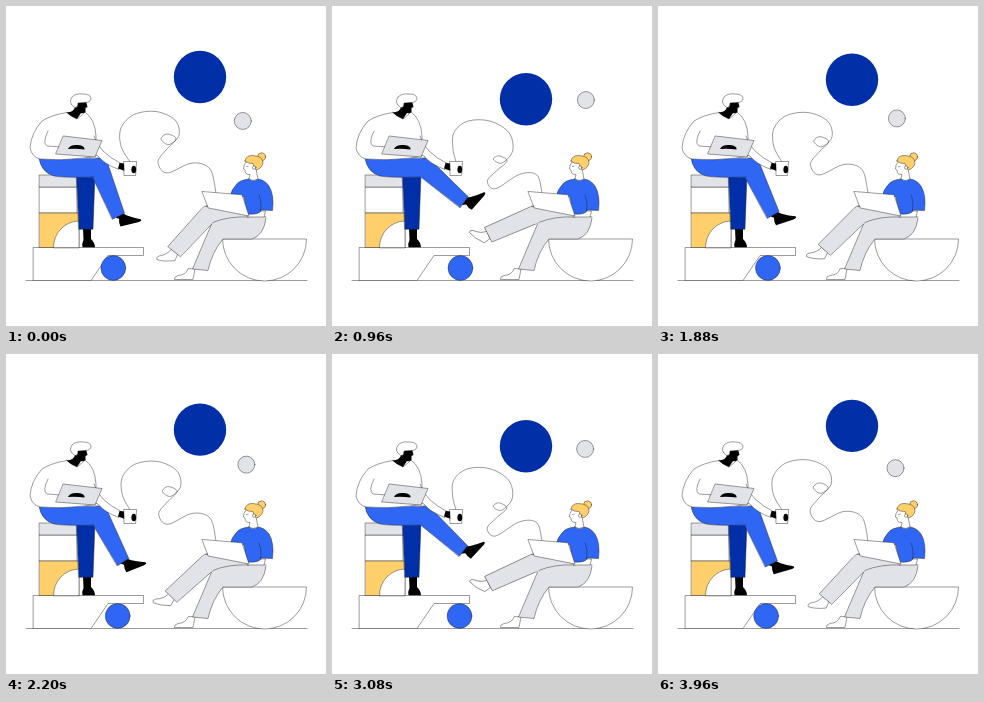
Animation of 320 by 320 pixels, one loop 4000 ms. Source, as an HTML page:

```html
<!DOCTYPE html>
<html lang="en">
<head>
<meta charset="utf-8">
<title>Coffee and laptops</title>
<style>
html, body { margin: 0; width: 100%; height: 100%; overflow: hidden; background: #fff; }
svg { display: block; width: 100vw; height: 100vh; }
.ln { fill: none; }
.flat { stroke: none; }
.w { fill: #fff; }
.k { fill: #000; stroke: none; }
.grey { fill: #e2e2e9; }
.blue { fill: #2f66f3; }
.navy { fill: #002fa7; }
.gold { fill: #ffcf6b; }
</style>
</head>
<body>
<svg viewBox="0 0 320 320" stroke="#222" stroke-width=".45" stroke-linejoin="round" stroke-linecap="round">
  <circle id="sun" class="navy flat" cx="194" r="26.2"/>
  <circle id="moon" class="grey" r="8.5"/>
  <path class="ln" d="M20 274.5H301"/>

  <!-- platform and stool -->
  <path class="w" d="M27.5 241.5H137.5V249.5H102L85 274.5H27.5Z"/>
  <circle id="ball" class="blue" cy="262" r="12.4"/>
  <path class="w" d="M33.5 181H71V207H33.5Z"/>
  <path class="grey" d="M33.5 169H71V181H33.5Z"/>
  <path class="gold" d="M33.5 207H73V241.5H33.5Z"/>
  <path class="w" d="M47.5 241.5A26 26 0 0 1 73 215V241.5Z"/>

  <path id="steam" class="ln"/>

  <!-- man -->
  <path class="k" d="M77 222H85V233Q89 237 89 241.2H76.5Q75.5 238 77.5 234Z"/>
  <path class="navy" d="M70.5 168H89L87 223.3H73Z"/>
  <g id="manShin">
    <path id="manFoot" class="k" d="M109 211L117 207.5L121 209.5Q128 212 134.5 213.2Q136.4 214.6 133 216L114.5 220.6Q112.6 217 113 213Z"/>
    <path class="blue" d="M84 165.7A9.7 9.7 0 1 1 102 158.3L118.5 207.3L106.5 213.2Z"/>
  </g>
  <path class="blue flat" d="M33 152L93 152.4A9.4 9.4 0 0 1 93 171.2Q60 172 48 170Q35 166 33 152Z"/>
  <path class="ln" d="M33 152Q35 166 48 170Q58 172 88 171M80 152H93"/>
  <path class="w" d="M61 106.5Q45 109 36 115Q25 127 24 142Q26 151 34 153Q55 155 78 152L90 150L90 130Q89 113 79 106Q75 110 71 113Q66 111 61 106.5Z"/>
  <path class="ln" d="M42 125Q36 137 41 140L55 141"/>
  <path class="w" d="M88 130Q92 146 116 158L113 163.5Q98 158 92 150L84 147"/>
  <path class="k" d="M69 97L80 95L81.5 101L79.5 102L79.5 106Q77 108 75 107L71 113Q65 111 60.5 106.5Q68 106 69 101Z"/>
  <path class="w" d="M68 101Q62 97 66 91Q70 87 77 88Q84 88 85 92Q85 96.5 79 96.5L72 97Q72 101 70 101.5Z"/>
  <path class="grey" d="M57.5 130L96 134.5L89 151L50 148Z"/>
  <path class="k" d="M62 143Q64 138.3 72 139Q79 139.7 78.5 143.5Q70 142.3 62 143Z"/>
  <path class="k" d="M113.5 157L119 157.5V165L112 162.5Z"/>
  <path class="w" d="M118 155.5H130.6L129.6 169.5H118.4Z"/>
  <ellipse class="k" cx="127.8" cy="163.5" rx="2.4" ry="3.8"/>

  <!-- woman -->
  <path class="w" d="M216.5 233H300.5A42 42 0 0 1 216.5 233Z"/>
  <path class="w" d="M189 263L187 273.5H168.5Q167.5 271 172 269.5Q180 269 182 263Z"/>
  <path class="grey" d="M206 217L186.5 263L202 264.5Q206 246 217 233H246Q258 229 260 212L225 206Z"/>
  <g id="womanShin">
    <path id="womanFoot" class="w" d="M165 243.5Q162 248.5 153 250Q149.5 251.5 151 253.6Q158 256 169 254.6L171.5 248.5Z"/>
    <path class="grey" d="M208.6 215.1A9 9 0 1 0 195.4 202.9L161.8 240.6L174.2 250.6Z"/>
  </g>
  <path class="grey flat" d="M202 200.4Q230 203 260 211L255 222Q232 214 210 217.4L202 217.6A8.6 8.6 0 0 1 202 200.4Z"/>
  <path class="ln" d="M200 200.2Q230 203 260 211M207 216.4Q222 210 243 211"/>
  <path class="blue" d="M243 173Q233 174 230 179Q225.5 184 225 188L238 191L241 209Q248 212 254 208L255 204L266.5 204.5Q268.5 189 263 180Q259 174 252 173Q247 176 243 173Z"/>
  <path class="ln" d="M253 189Q256 196 254.5 205"/>
  <path class="w" d="M255 205L259.5 205L258 211L241 211L242 208Q252 209 255 205Z"/>
  <path class="w" d="M240 156Q237 160 237.5 163L239 164Q239 169 244 168.5L243 173Q247 176 252 173L250 163L249 156Z"/>
  <circle class="gold" cx="255.6" cy="150.8" r="4"/>
  <path class="gold" d="M239 155Q240 149 247 149.5Q257 150 257 157Q256 162 250.5 164L248 161L247 157.5Q242 158 239 155Z"/>
  <circle class="w" cx="248.2" cy="161.6" r="1.7"/>
  <path class="ln" d="M240.5 160.5L242 160.2"/>
  <path class="w" d="M196.3 185.5L236 188.8L243 210L202.5 202Z"/>
</svg>
<script>
const PERIOD = 2000;
const get = id => document.getElementById(id);
const set = (id, attrs) => {
  for (const [name, value] of Object.entries(attrs)) get(id).setAttribute(name, value);
};
const turn = (id, deg, x, y) => set(id, { transform: `rotate(${deg} ${x} ${y})` });

// Key points of the steam at rest
const steam = [
  [124, 156], [115, 140], [115, 122], [128, 108.5], [150, 105.5], [169, 114],
  [173, 129], [163, 138.5], [155, 133], [161, 128], [170, 133], [160, 144],
  [152, 156], [161, 167], [186, 157], [204, 163], [210, 187]
];

// The middle of the steam sinks and drifts right; both ends stay put
function sway([x, y], u, p) {
  return [
    x + 8.5 * p * Math.sin(Math.PI * Math.sqrt(u)),
    y + 23 * p * Math.sin(Math.PI * u ** 1.4)
  ];
}

// Smooth path through points (Catmull-Rom)
function spline(pts) {
  const at = i => pts[Math.max(0, Math.min(pts.length - 1, i))];
  let d = 'M' + pts[0];
  for (let i = 0; i < pts.length - 1; i++) {
    const a = at(i - 1), b = at(i), c = at(i + 1), e = at(i + 2);
    const c1 = b.map((v, k) => v + (c[k] - a[k]) / 6);
    const c2 = c.map((v, k) => v - (e[k] - b[k]) / 6);
    d += `C${c1} ${c2} ${c}`;
  }
  return d;
}

function draw(ms) {
  const phase = (ms % PERIOD) / PERIOD;
  const p = 1 - Math.abs(1 - 2 * phase);
  set('sun', { cy: 71 + 23.2 * p });
  set('moon', { cx: 236.8 + 17.8 * p, cy: 115 - 21.8 * p });
  set('ball', { cx: 107.3 + 22 * p });
  turn('manShin', -28 * p, 93, 162);
  turn('manFoot', -8 * p, 114, 211);
  turn('womanShin', 25 * p, 202, 209);
  turn('womanFoot', 8 * p, 168, 246);
  set('steam', { d: spline(steam.map((pt, i) => sway(pt, i / (steam.length - 1), p))) });
}

const start = performance.now();
function tick() {
  draw(performance.now() - start);
  requestAnimationFrame(tick);
}
tick();
</script>
</body>
</html>
```
